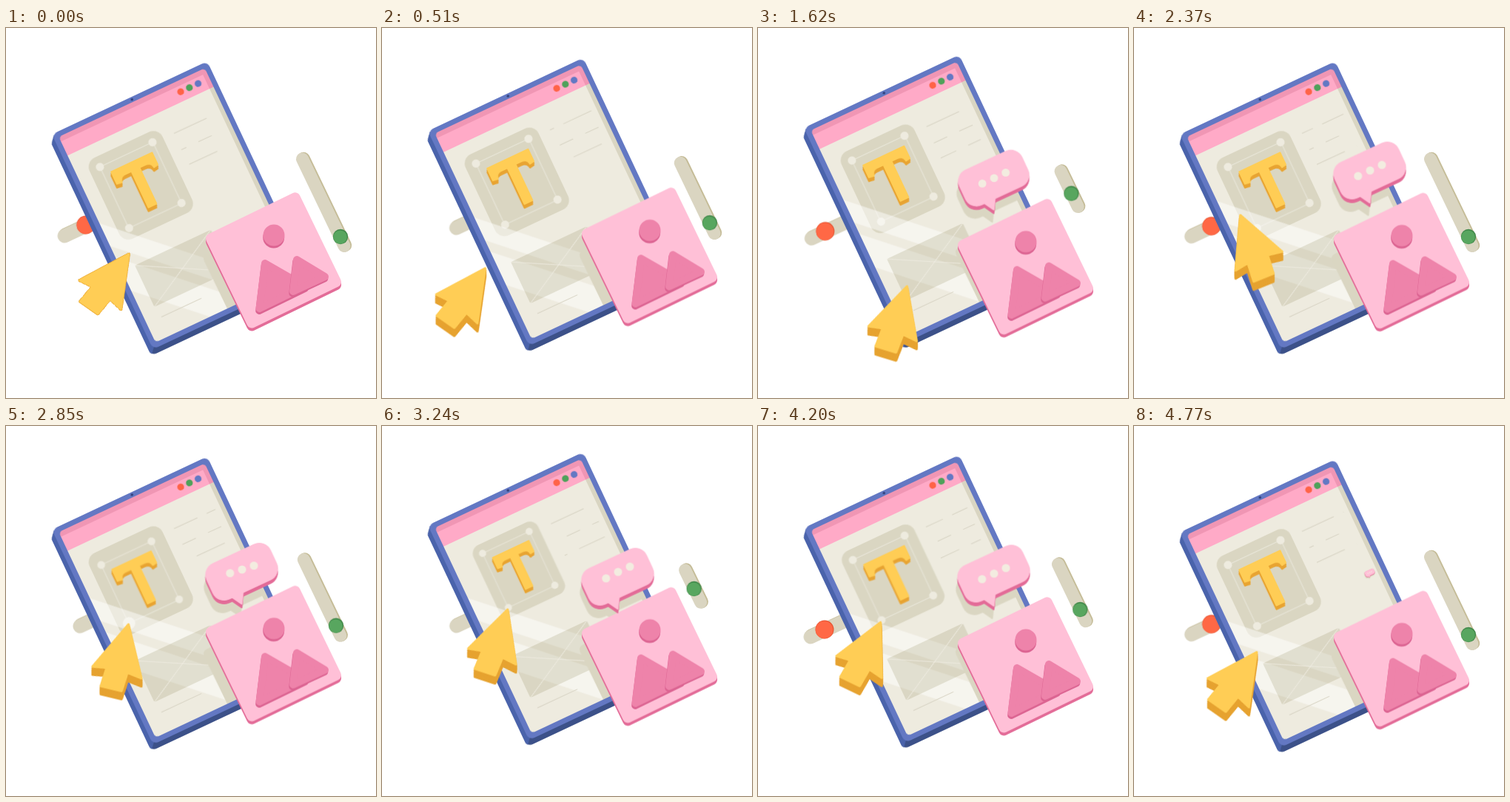
These frames come from a looping animation (500x500 px, 4800 ms). An HTML page without scripts:

```html
<!DOCTYPE html>
<html lang="en">
<head>
<meta charset="utf-8">
<title>Design tablet</title>
<style>
  html, body { margin: 0; width: 100%; height: 100%; overflow: hidden; background: #fff; }
  svg { display: block; width: 100vw; height: 100vh; }

  /* Swinging parts: 1200 ms each way */
  .tablet, .card, .bubble, .bubble-shadow, .track, .rod, .rod-knob, .knob {
    animation: 1200ms cubic-bezier(.37, 0, .63, 1) infinite alternate;
  }
  .tablet { animation-name: tablet; }
  .card { animation-name: card; animation-delay: -660ms; }
  .bubble { animation-name: bubble; }
  .bubble-shadow { animation-name: bubble-shadow; }
  .track, .knob, .rod, .rod-knob { animation-timing-function: cubic-bezier(.72, 0, .28, 1); }
  .track { animation-name: track; }
  .knob { animation-name: knob; }
  .rod { animation-name: rod; animation-delay: -1710ms; }
  .rod-knob { animation-name: rod-knob; animation-delay: -585ms; }
  @keyframes tablet { to { transform: translateY(-12px); } }
  @keyframes card { from { transform: translateY(9px); } to { transform: translateY(-6.6px); } }
  @keyframes bubble { from { transform: translateY(-7px); } to { transform: translateY(7px); } }
  @keyframes bubble-shadow { from { transform: translateY(-7px); } to { transform: translateY(19px); } }
  @keyframes track {
    from { d: path("M400.5 177L457 294.5"); }
    to { d: path("M410.5 196.5L428 232.5"); }
  }
  @keyframes knob { from { transform: translate(452px, 282px); } to { transform: translate(418.5px, 213.5px); } }
  @keyframes rod { from { transform: translate(101px, 270px); } to { transform: translate(71px, 285px); } }
  @keyframes rod-knob { from { transform: translate(90px, 275px); } to { transform: translate(129px, 255.5px); } }

  .glare { animation: glare 2400ms cubic-bezier(.37, 0, .63, 1) infinite alternate; }
  @keyframes glare { to { transform: translate(-14px, -30px); } }
  .tint { mix-blend-mode: multiply; }

  /* Text lines: dashes running along each line */
  .dash { animation: dash linear infinite; stroke-dashoffset: var(--from); }
  .dash1 { --from: 0; --to: -56.5; stroke-dasharray: 44 12.5; animation-duration: 1600ms; }
  .dash2 { --from: -23; --to: -57.3; stroke-dasharray: 18 16.3; animation-duration: 1200ms; }
  .dash3 { --from: -.5; --to: -54.5; stroke-dasharray: 38 16; animation-duration: 2400ms; }
  @keyframes dash { from { stroke-dashoffset: var(--from); } to { stroke-dashoffset: var(--to); } }

  .dot { animation: dot 2400ms ease-in-out var(--wait, 0ms) infinite; }
  @keyframes dot {
    0%, 56%, 100% { transform: none; }
    26% { transform: translateY(-6.5px); }
  }

  .pop, .resize, .press, .grip, .move, .turn { animation: 4800ms ease-in-out infinite; }
  .pop { animation-name: pop; transform-origin: 0 6.5px; }
  @keyframes pop {
    0%, 25% { transform: scale(0); animation-timing-function: cubic-bezier(.4, 0, .3, 1); }
    35.4% { transform: scale(1); }
    91.7% { transform: scale(1); animation-timing-function: cubic-bezier(.11, 0, .5, 0); }
    100% { transform: scale(0); }
  }
  .resize { animation-name: resize; transform-origin: 134px 53px; }
  @keyframes resize {
    0%, 61.5%, 89.6%, 100% { transform: scale(1); }
    71.9%, 79.2% { transform: scale(.82); }
  }
  .press { animation-name: press; transform-origin: 40.5px 159px; }
  @keyframes press {
    0%, 56%, 63.5%, 100% { transform: scale(1); }
    59.4% { transform: scale(.955); }
  }
  .grip { animation-name: grip; transform-origin: 40.5px 159px; }
  @keyframes grip {
    0%, 56%, 63.5%, 100% { transform: scale(1); }
    59.4% { transform: scale(1.6); }
  }
  .move { animation-name: move; }
  @keyframes move {
    0%, 6.9% { transform: translate(167px, 304px); }
    15.8% { transform: translate(95px, 356px); animation-timing-function: ease-in; }
    19.4% { transform: translate(149px, 338px); animation-timing-function: ease-out; }
    24% { transform: translate(190px, 328px); }
    33.75% { transform: translate(202px, 347px); animation-timing-function: ease-out; }
    37.5%, 44.4% { transform: translate(203px, 353px); }
    49.4% { transform: translate(143px, 251px); }
    56%, 59.4% { transform: translate(166px, 266px); }
    61.5% { transform: translate(166px, 265px); }
    71.9%, 79.2% { transform: translate(173px, 235px); }
    89.6% { transform: translate(166px, 266px); }
    98.5%, 100% { transform: translate(167px, 304px); }
  }
  .turn { animation-name: turn; }
  @keyframes turn {
    0%, 19.4% { transform: rotate(35deg); }
    24% { transform: rotate(29deg); }
    33.75%, 44.4% { transform: rotate(17deg); }
    49.4% { transform: rotate(-22deg); }
    59.4% { transform: rotate(13.5deg); }
    71.9%, 79.2% { transform: rotate(20deg); }
    98.5%, 100% { transform: rotate(35deg); }
  }
</style>
</head>
<body>
<svg viewBox="0 0 500 500">
  <defs>
    <clipPath id="screen"><rect x="7" y="7" width="218" height="307" rx="5"/></clipPath>
    <rect id="slab" width="232" height="321" rx="8"/>
    <path id="letter" d="M51 80H112V98L106 99Q105 91 97 91H88V145H76V91H66Q59 91 58 99L51 98Z" stroke-width="2" stroke-linejoin="round"/>
    <g id="speech">
      <rect x="-47.5" y="-26.5" width="95" height="53" rx="17" transform="rotate(-25)"/>
      <path d="M-18 31L0 43.5L2 24Z" stroke-width="2" stroke-linejoin="round"/>
    </g>
    <rect id="sheet" width="140.5" height="140.5" rx="7" transform="translate(267.6 281.4) rotate(-25.9)"/>
    <g id="hill" stroke-width="10" stroke-linejoin="round">
      <circle cx="362" cy="280" r="14.5" stroke="none"/>
      <path d="M350 318L342.5 379L404 349Z"/>
    </g>
    <path id="peak" d="M393 313L388 356L431 336Z" stroke-width="10" stroke-linejoin="round"/>
    <path id="pointer" d="M0 2L34 69L14 66L12 92L-17 92L-15 66L-34 69Z" stroke-width="3" stroke-linejoin="round"/>
  </defs>

  <!-- Sliders -->
  <g fill="none" stroke-linecap="round" stroke-width="17">
    <g transform="translate(1.7 -.8)"><path class="track" d="M400.5 177L457 294.5" stroke="#c5bc97"/></g>
    <path class="track" d="M400.5 177L457 294.5" stroke="#dad5c1"/>
  </g>
  <g class="knob">
    <circle r="10.2" fill="#438a4c"/>
    <circle cx="-.4" cy=".6" r="9.2" fill="#58a65f"/>
  </g>
  <g class="rod" stroke-linecap="round" stroke-width="19">
    <path d="M1 -1.2L61 -29.2" stroke="#c5bc97"/>
    <path d="M0 0L60 -28" stroke="#dad5c1"/>
  </g>
  <g class="rod-knob">
    <circle r="12.5" fill="#e4512f"/>
    <circle cx="-.4" cy=".4" r="11.8" fill="#ff6845"/>
  </g>

  <g class="tablet">
    <g transform="translate(62 143.7) rotate(-25.2)">
      <g fill="#3c5189">
        <use href="#slab" x="-6" y="7"/>
        <use href="#slab" x="-4" y="4.7"/>
        <use href="#slab" x="-2" y="2.3"/>
      </g>
      <path d="M2 2L-4 9Q-6 11 -6 15V320Q-6 324 -4 326L2 319Z" fill="#4a63ab"/>
      <use href="#slab" fill="#6378c3"/>
      <circle cx="118" cy="3.5" r="1.7" fill="#2f3f7a"/>

      <g clip-path="url(#screen)">
        <rect x="7" y="7" width="218" height="307" fill="#d9d5c2"/>
        <rect x="7" y="7" width="218" height="28" fill="#f096b4"/>
        <rect x="7" y="35" width="212" height="279" fill="#eeebdf"/>
        <rect x="7" y="14" width="212" height="21" fill="#ffaac7"/>
        <circle cx="182" cy="22" r="4.6" fill="#ff6347"/>
        <circle cx="195" cy="22" r="4.6" fill="#4fa15a"/>
        <circle cx="208" cy="22" r="4.6" fill="#6378c3"/>

        <g class="resize">
          <rect x="25" y="53" width="109" height="121" rx="14" fill="#dad6c2"/>
          <g class="press">
            <rect x="40" y="67.5" width="79" height="91.5" fill="none" stroke="#e8e5d8" stroke-width="1.2"/>
            <g fill="#eeebdf">
              <circle cx="40" cy="67.5" r="5.5"/>
              <circle cx="118.5" cy="67.5" r="5.5"/>
              <circle cx="119" cy="158.5" r="5.5"/>
              <circle class="grip" cx="40.5" cy="159" r="5.5"/>
            </g>
            <g fill="#e8a432" stroke="#e8a432">
              <use href="#letter" x="-2.2" y="4.7"/>
              <use href="#letter" x="-1.1" y="2.4"/>
            </g>
            <use href="#letter" fill="#ffcd55" stroke="#ffcd55"/>
          </g>
        </g>

        <g transform="rotate(25.2) translate(-62 -143.7)">
          <path class="glare" d="M90 252L360 341V367L90 278ZM90 291L360 380V418L90 329Z" fill="#fff" fill-opacity=".48"/>
        </g>
        <rect class="tint" x="26" y="208" width="113.5" height="62" rx="2" fill="#eae9df"/>
        <path d="M26 208L139.5 270M26 270L139.5 208" stroke="#eeebe0"/>

        <g transform="rotate(25.2) translate(-62 -143.7)">
          <g fill="none" stroke="#dad6c7" stroke-width="1.2">
            <path class="dash dash1" pathLength="56" d="M227 142.5L283 116.4"/>
            <path class="dash dash2" pathLength="56" d="M237 164.5L293 138.4"/>
            <path class="dash dash3" pathLength="54" d="M247 184.5L301 159.3"/>
            <path d="M210 390.5L264 365.3"/>
          </g>
          <use href="#sheet" fill="#dad6c2" transform="translate(-3 27)"/>
          <g class="bubble-shadow">
            <g transform="translate(318.5 199.5)">
              <g class="pop"><use href="#speech" x="-2" y="17" fill="#dad6c2" stroke="#dad6c2"/></g>
            </g>
          </g>
        </g>
      </g>
    </g>
  </g>

  <g class="card">
    <use href="#sheet" y="4" fill="#e36c98" transform="translate(0 0)"/>
    <use href="#sheet" y="2" fill="#e36c98"/>
    <use href="#sheet" fill="#ffc0d7"/>
    <use href="#hill" x="-.3" y="3" fill="#dc6492" stroke="#dc6492"/>
    <use href="#hill" fill="#ee83aa" stroke="#ee83aa"/>
    <use href="#peak" x="-.7" y="2.5" fill="#dc6492" stroke="#dc6492"/>
    <use href="#peak" fill="#ee83aa" stroke="#ee83aa"/>
  </g>

  <g class="bubble">
    <g transform="translate(318.5 199.5)">
      <g class="pop">
        <g fill="#e36c98" stroke="#e36c98">
          <use href="#speech" y="5"/>
          <use href="#speech" y="2.5"/>
        </g>
        <use href="#speech" fill="#ffc0d7" stroke="#ffc0d7"/>
        <g fill="#f3ece0">
          <circle class="dot" cx="-15.7" cy="7.5" r="5.5"/>
          <circle class="dot" style="--wait: 160ms" cx=".5" cy="0" r="5.5"/>
          <circle class="dot" style="--wait: 320ms" cx="16.5" cy="-7.5" r="5.5"/>
        </g>
      </g>
    </g>
  </g>

  <g class="move">
    <g fill="#e6a22f" stroke="#e6a22f">
      <use class="turn" href="#pointer" style="translate: 0 11px"/>
      <use class="turn" href="#pointer" style="translate: 0 9px"/>
      <use class="turn" href="#pointer" style="translate: 0 7px"/>
      <use class="turn" href="#pointer" style="translate: 0 5px"/>
      <use class="turn" href="#pointer" style="translate: 0 2.5px"/>
    </g>
    <use class="turn" href="#pointer" fill="#ffcd55" stroke="#ffcd55"/>
  </g>
</svg>
</body>
</html>
```
